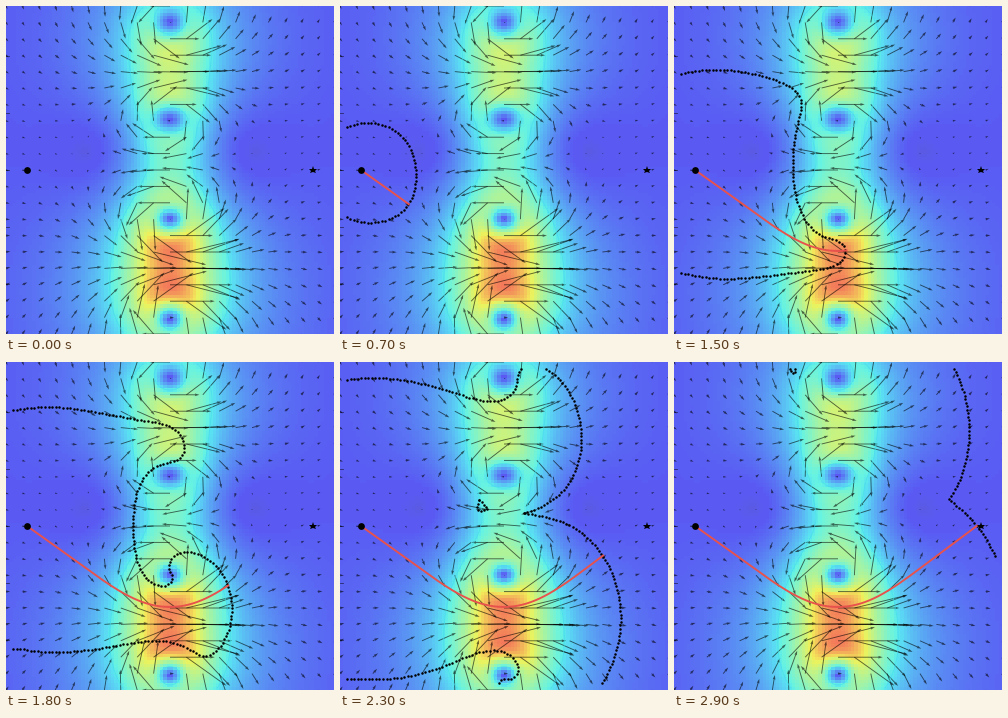
A matplotlib script for the animation above (3000 ms loop, 328 by 328 pixels).

```python
import numpy as np
import matplotlib.pyplot as plt
from matplotlib.animation import FuncAnimation

SIZE, FRAMES, DPI = 328, 30, 100
PX = 72 / DPI
START, GOAL = np.array([21.0, 164.0]), np.array([307.0, 164.0])

# All speeds are in pixels per frame
SWIM = 7.1
CORE = 25
JETS = [(0.2 * SIZE, 330), (0.8 * SIZE, 480)]
VORTICES = [(y + side * 45, -side * gamma) for y, gamma in JETS for side in (-1, 1)]


def current(x, y):
    """Two vortex pairs, each driving a jet to the right."""
    u, v = 0.0, 0.0
    dx = x - SIZE / 2
    for center, gamma in VORTICES:
        dy = y - center
        spin = gamma / np.sqrt(CORE ** 4 + (dx ** 2 + dy ** 2) ** 2)
        u = u + spin * dy
        v = v - spin * dx
    return u, v


# Reachable set: level set carried by the current and grown by swimming
H = 2.0
AXIS = np.arange(7, 322, H)
GX, GY = np.meshgrid(AXIS, AXIS)
U, V = current(GX, GY)
SUBSTEPS = 30
FREE_TIME = 4  # the current is almost uniform this close to the start


def slopes(phi, axis):
    """Second-order one-sided differences, backward and forward."""
    pad = [(2, 2) if a == axis else (0, 0) for a in (0, 1)]
    p = np.moveaxis(np.pad(phi, pad, mode="edge"), axis, 0)
    d = np.diff(p, axis=0) / H
    c = np.diff(d, axis=0)
    a, b = c[:-1], c[1:]
    bend = 0.5 * np.where(a * b > 0, np.where(abs(a) < abs(b), a, b), 0)
    edge = d[1:-1]
    return (np.moveaxis((edge + bend)[:-1], 0, axis),
            np.moveaxis((edge - bend)[1:], 0, axis))


def rate(phi):
    drift, steep = 0, 0
    for axis, w in ((1, U), (0, V)):
        back, ahead = slopes(phi, axis)
        drift = drift + w * np.where(w > 0, back, ahead)
        steep = steep + np.maximum(np.maximum(back, 0) ** 2,
                                   np.minimum(ahead, 0) ** 2)
    return -(SWIM * np.sqrt(steep) + drift)


def advance(phi):
    dt = 1 / SUBSTEPS
    for _ in range(SUBSTEPS):
        guess = phi + dt * rate(phi)
        phi = 0.5 * (phi + guess + dt * rate(guess))
    return phi


def free_circle(t):
    cx, cy = START + t * np.array(current(*START))
    return np.hypot(GX - cx, GY - cy) - SWIM * t


def level_sets():
    sets = [free_circle(t) for t in range(FREE_TIME + 1)]
    while len(sets) < FRAMES:
        sets.append(advance(sets[-1]))
    return sets


# Fastest route: the ray of optimal headings that meets the goal
RAY_STEPS = 40


def fastest_route():
    heading = np.radians(np.linspace(12, 65, 900))
    x, y = np.full(900, START[0]), np.full(900, START[1])
    lx, ly = np.cos(heading), np.sin(heading)
    dt, eps = 1 / RAY_STEPS, 0.5
    track = [np.array([x, y])]
    for _ in range(31 * RAY_STEPS):
        u, v = current(x, y)
        ux, vx = (np.array(current(x + eps, y)) - current(x - eps, y)) / (2 * eps)
        uy, vy = (np.array(current(x, y + eps)) - current(x, y - eps)) / (2 * eps)
        norm = np.hypot(lx, ly)
        x, y = x + dt * (u + SWIM * lx / norm), y + dt * (v + SWIM * ly / norm)
        lx, ly = (lx - dt * (ux * lx + vx * ly)) / norm, \
                 (ly - dt * (uy * lx + vy * ly)) / norm
        track.append(np.array([x, y]))
    track = np.array(track)
    miss = np.hypot(track[:, 0] - GOAL[0], track[:, 1] - GOAL[1])
    last, best = np.unravel_index(miss.argmin(), miss.shape)
    return track[:last + 1, :, best]


def spaced(curve, gap=3.6):
    s = np.concatenate([[0], np.cumsum(np.hypot(*np.diff(curve, axis=0).T))])
    at = np.linspace(0, s[-1], int(s[-1] / gap) + 2)
    return np.column_stack([np.interp(at, s, curve[:, i]) for i in (0, 1)])


fig = plt.figure(figsize=(SIZE / DPI, SIZE / DPI), dpi=DPI)
ax = fig.add_axes([0, 0, 1, 1])
ax.axis("off")


def front_dots(phi):
    lines = ax.contour(GX, GY, phi, levels=[0])
    curves = [c for c in lines.allsegs[0] if len(c) > 1]
    lines.remove()
    return np.vstack([np.empty((0, 2))] + [spaced(c) for c in curves])


FRONTS = [np.empty((0, 2))] + [front_dots(phi) for phi in level_sets()[1:]]
ROUTE = fastest_route()

cells = (np.arange(100) + 0.5) * SIZE / 100
cx, cy = np.meshgrid(cells, cells)
speed = np.hypot(*current(cx, cy))
shade = plt.get_cmap("jet")(0.09 + 0.0375 * speed)[..., :3]
ax.imshow(0.6 * shade + 0.355, extent=(0, SIZE, SIZE, 0), interpolation="nearest")
ax.contour(cx, cy, speed, levels=[SWIM], colors=["#46dcec"],
           linewidths=0.8 * PX, alpha=0.75)

nodes = np.arange(21) * SIZE / 20
qx, qy = np.meshgrid(nodes, nodes)
ax.quiver(qx, qy, *current(qx, qy), angles="xy", scale_units="xy",
          scale=1 / 3.05, units="dots", width=0.9, color="black", alpha=0.6)

for y in (50, 107, 164, 221, 278):
    ax.plot([0, 2.5], [y, y], color="black", lw=0.8 * PX, alpha=0.6)

dots, = ax.plot([], [], "o", color="black", ms=2.5 * PX, mew=0, zorder=4)
line, = ax.plot([], [], color="#e8524c", lw=1.9 * PX, zorder=5)
ax.plot(*START, "o", color="black", ms=6.8 * PX, mew=0, zorder=6)
ax.plot(*GOAL, "*", color="black", ms=8.6 * PX, mew=0, zorder=6)
ax.set_xlim(0, SIZE)
ax.set_ylim(SIZE, 0)


def draw(t):
    dots.set_data(*FRONTS[t].T)
    line.set_data(*ROUTE[:t * RAY_STEPS + 1].T)
    return dots, line


anim = FuncAnimation(fig, draw, frames=FRAMES, interval=100, repeat=True)
plt.show()
```
